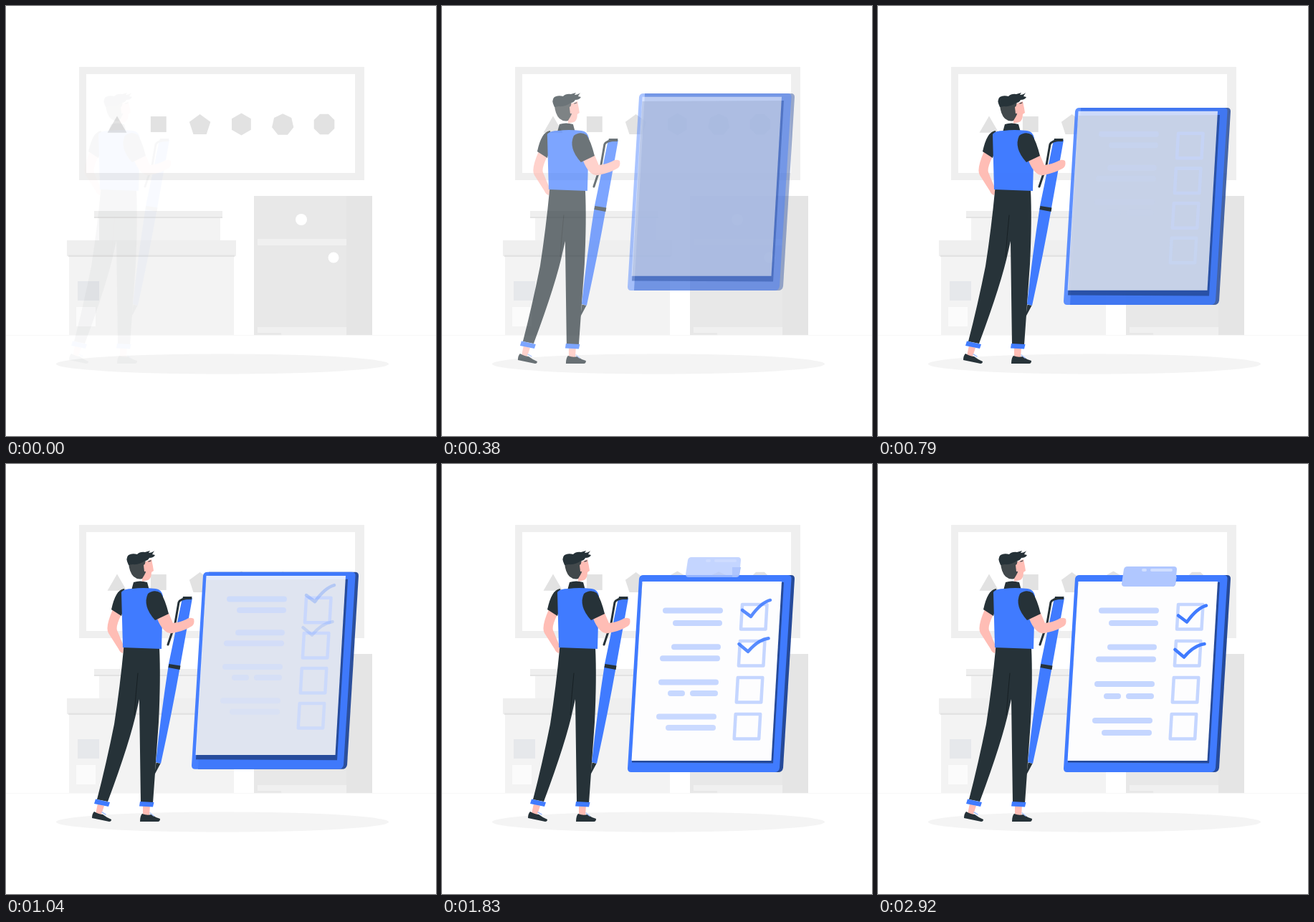
An HTML page that plays this animation: 600 by 600 pixels, repeating every 3210 ms.

```html
<!DOCTYPE html>
<html lang="en">
<head>
<meta charset="utf-8">
<title>Checklist</title>
<style>
  html, body { margin: 0; width: 100%; height: 100%; overflow: hidden; background: #fff; }
  svg { display: block; width: 100%; height: 100%; }
  .blue { fill: #407bff; }
  .navy { fill: #264a99; }
  .dark { fill: #263238; }
  .skin { fill: #ffbdb5; }
  .line { fill: none; stroke-linecap: round; stroke-linejoin: round; }
  .pale { stroke: #c5d6ff; }
</style>
</head>
<body>
<svg viewBox="0 0 600 600">
  <g id="room">
    <path d="M0 459.500H600" stroke="#f7f7f7"/>
    <path fill="#efefef" fill-rule="evenodd" d="M102 85H500V243H102ZM112 95V233H487V95Z"/>
    <g id="shapes" fill="#e2e2e2"></g>
    <path fill="#f3f3f3" d="M130 296H299V328H130ZM88 349H318V459H88Z"/>
    <path fill="#efefef" d="M123 286H302V296H123ZM85 327H321V349H85Z"/>
    <path fill="#e3e3e3" d="M123 294H302V296H123ZM87 347.500H319V350H87Z"/>
    <path fill="#e6e8eb" d="M100 384H130V411H100Z"/>
    <path fill="#fbfbfb" d="M98 420H125V447H98Z"/>
    <path fill="#f0f0f0" d="M346 265H476V459H346Z"/>
    <path fill="#e8e8e8" d="M346 265H476V325H351V334H476V448H351V456H384V459H346Z"/>
    <path fill="#e8e8e8" d="M351 334H476V448H351Z"/>
    <path fill="#e5e5e5" d="M475 265H511V459H475Z"/>
    <g fill="#fff"><circle cx="412" cy="298" r="8"/><circle cx="457" cy="351" r="7.500"/></g>
    <ellipse cx="302" cy="499.500" rx="232" ry="14" fill="#f4f4f4"/>
  </g>

  <path class="board navy" d="M283 155H487Q492 155 492 160L476 424Q475 430 469 430H268Z"/>
  <path class="board blue" d="M281 155H482Q488 155 487.500 160L471 424Q470 430 464 430H264Q259 430 259 425L275 160Q276 155 281 155Z"/>
  <path class="board navy" d="M279.500 166L477 165L462 417.500L265 416.500Z"/>
  <path id="paper" fill="#fdfdfe" d="M279.500 164H474L459.500 414H264.500Z"/>
  <g id="lines" class="line pale" stroke-width="8"></g>
  <g id="boxes" class="line pale" stroke-width="4.500"></g>
  <g class="line" stroke="#407bff" stroke-width="4.500">
    <path class="tick" d="M419 211.500L431 220.500Q445 201 458 197.500"/>
    <path class="tick" d="M414.500 259L427 269.500Q441 253 455.500 251"/>
  </g>
  <path class="clip" fill="#8fadf5" d="M405 157H417L415 168Q414 171 411 171H405Z"/>
  <path class="clip" fill="#b0c7ff" d="M348 143H413Q417 143 417 147L415 167Q414 171 410 171H344Q340 171 340 167L343 147Q344 143 348 143Z"/>
  <path class="clip line" stroke="#d2dfff" stroke-width="4" d="M370 148H373M382 148H409"/>

  <g id="man">
    <path class="skin" d="M128 474L137 477L133 489L125 488ZM191 476H201L200 491H191Z"/>
    <path class="dark" d="M123 485Q130 489 135 489Q140 493 147 496Q147 499 144 499L120 494Q120 488 123 485ZM190 488Q197 491 203 489Q208 493 215 495Q215 499 212 499H187Q187 491 190 488Z"/>
    <path class="line" stroke="#a8c2ff" stroke-width="1.500" d="M134 486L139 489M201 487L206 491"/>
    <path class="skin" d="M149 203L161 210Q153 226 155 232L165 256L163 264Q159 263 157 258L143 236Q138 228 149 203Z"/>
    <path class="dark" d="M164.500 254L214 256Q216 300 213 360L205 473H188L186 328L183 341Q174 385 142 471L127 468Q140 418 151 363Q159 312 164.500 254Z"/>
    <path class="line" stroke="#172024" d="M184 292Q181 322 179 350"/>
    <path class="blue" d="M125 467.500L145 472L143 478L123 474ZM187 471L206.500 472L205 478.500L186 477.500Z"/>
    <path class="dark" d="M178 165Q187 162 197 165L200 176H175ZM165 174Q153 175 147 203L161 212L168 190Z"/>
    <path class="blue" d="M161 179Q164 174 177 174Q190 172 209 174Q217 175 219 184L217 258L163 256Z"/>
    <path class="skin" d="M190 138L203 133Q205 142 206 149L203 151Q203 160 198 162L190 164Z"/>
    <path fill="#41484b" d="M171 138L195 134L193 143Q197 150 193 155L190 160Q184 162 178 157Q172 151 171 138Z"/>
    <path class="skin" d="M192 141Q196 137 198 143Q197 151 193 150Z"/>
    <path class="line" stroke="#263238" stroke-width="1.300" d="M199 136L202 135"/>
    <path class="dark" d="M171 141Q166 131 171 127Q176 124 183 126Q187 122 194 123L201 121L199 124Q204 124 207 121L204 126L208 127Q206 131 200 131Q198 135 194 135Q186 141 177 140Z"/>
    <path class="blue" d="M246 187H260L243 282Q232 345 216 418L209 416Q216 350 227 279Z"/>
    <path class="dark" d="M247 185L259.500 185L259 189L246 189ZM227.500 279L243.500 281.500L242.500 287L226.500 284ZM209.500 416.500L215.500 418L207 434Z"/>
    <path class="line" stroke="#263238" stroke-width="3" d="M256 187Q243 188 241 193L236 222L226 252"/>
    <path class="skin" d="M211 216L227 208L233 222Q243 221 251 217Q257 213 262 216Q264 224 258 227Q248 233 232 236Q220 238 211 216Z"/>
    <path class="dark" d="M198 181Q207 174 216 180Q222 189 227 209L208 218Q190 198 198 181Z"/>
  </g>
</svg>
<script>
  const LOOP = 3210;
  const actors = [];
  const $ = id => document.getElementById(id);

  function addPath(parent, d) {
    const path = document.createElementNS("http://www.w3.org/2000/svg", "path");
    path.setAttribute("d", d);
    parent.append(path);
    return path;
  }

  function enter(node, start, duration, { dx = 0, dy = 0, fade = 0, fadePower = 2 }) {
    actors.push({ node, start, duration, dx, dy, fade, fadePower });
  }

  // Wall shapes: triangle to octagon, centred on their bounding boxes
  const radius = 15.5;
  for (let sides = 3; sides <= 8; sides++) {
    const odd = sides % 2;
    const cx = 155 + (sides - 3) * 57.8;
    const cy = 165 + odd * radius * (1 - Math.cos(Math.PI / sides)) / 2;
    const points = Array.from({ length: sides }, (_, k) => {
      const angle = ((odd ? -0.25 : 0.5 / sides) + k / sides) * 2 * Math.PI;
      return `${cx + radius * Math.cos(angle)} ${cy + radius * Math.sin(angle)}`;
    });
    addPath($("shapes"), `M${points.join("L")}Z`);
  }

  const textLines = [
    "M312 204.5H388", "M326 222H387", "M324 255.5H385", "M308 272.5H384",
    "M306 307H382", "M319 324H335M350 324H381", "M303 358H379", "M316 375H378"
  ];
  textLines.forEach((d, i) =>
    enter(addPath($("lines"), d), 560 + i * 42, 1150 + i * 45, { dy: -36 }));

  for (let i = 0; i < 4; i++) {
    const d = `M${419 - 3.1 * i} ${196 + 51 * i}h34.5l-2 34.500h-34.500Z`;
    enter(addPath($("boxes"), d), 393 + i * 56, 1090, { dy: -36 });
  }

  const enterAll = (selector, ...timing) =>
    document.querySelectorAll(selector).forEach(node => enter(node, ...timing));

  enter($("man"), 22, 854, { dx: -32, fade: 0.03 });
  enterAll(".board", 81, 1185, { dy: -51 });
  enter($("paper"), 140, 1270, { dy: -51, fade: 0.4, fadePower: 1.2 });
  enterAll(".clip", 1056, 1567, { dy: -36 });
  document.querySelectorAll(".tick").forEach((node, i) =>
    enter(node, 810 + i * 90, 1580 - i * 130, { dy: -36 }));

  function render() {
    const time = performance.now() % LOOP;
    for (const { node, start, duration, dx, dy, fade, fadePower } of actors) {
      const left = 1 - Math.min(1, Math.max(0, (time - start) / duration));
      const rest = left ** 1.5;
      const waiting = left === 1 && node.id === "paper";
      node.setAttribute("transform", `translate(${dx * rest} ${dy * rest})`);
      node.setAttribute("opacity", waiting ? 0 : 1 - (1 - fade) * left ** fadePower);
    }
    requestAnimationFrame(render);
  }
  render();
</script>
</body>
</html>
```
